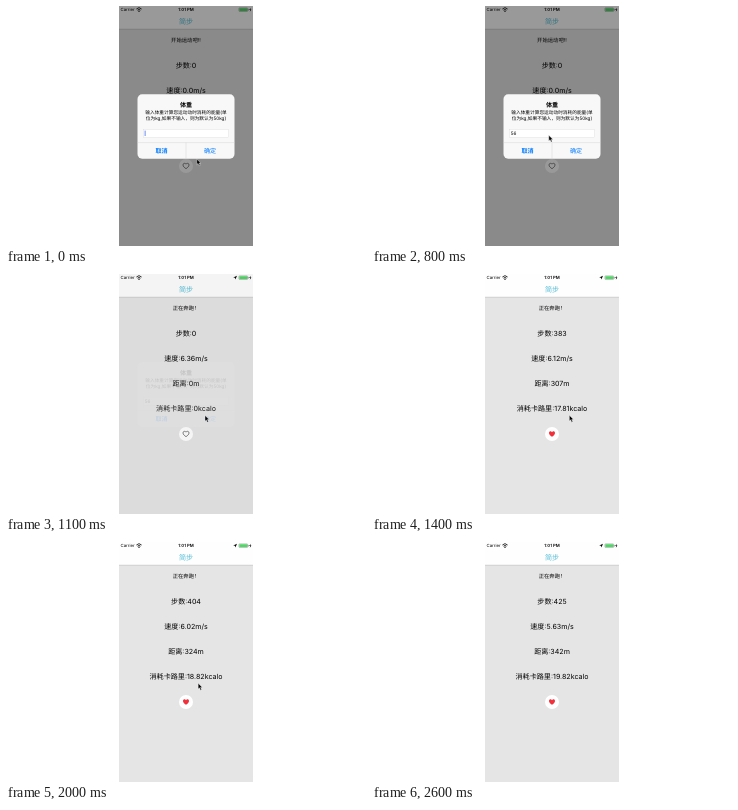
Write an HTML page that moves like this. It is 360 by 240 pixels and loops after 2.7 s.

```html
<!DOCTYPE html>
<html lang="zh-CN">
<head>
<meta charset="utf-8">
<title>简步</title>
<style>
  html, body { margin: 0; width: 100%; height: 100%; overflow: hidden; background: #fff; }
  svg { display: block; width: 360px; height: 240px; }
  text {
    font-family: Inter, "Noto Sans CJK SC", "Noto Sans CJK", sans-serif;
    text-anchor: middle; text-rendering: geometricPrecision; fill: #000;
  }
  .row { font-size: 7.1px; }
  .hint { font-size: 5.35px; }
  .bar { font-size: 4.3px; }
  .msg { font-size: 4.7px; }
  .btn { font-size: 6.1px; fill: #007aff; }
  .left { text-anchor: start; }
</style>
</head>
<body>
<svg viewBox="0 0 360 240">
  <defs><clipPath id="phone"><rect x="113" width="134" height="240"/></clipPath></defs>
  <g clip-path="url(#phone)">
    <rect x="113" width="134" height="240" fill="#e5e5e5"/>
    <rect x="113" width="134" height="23" fill="#fefefe"/>
    <path d="M113 23.2H247" stroke="#b4b4b4" stroke-width=".5"/>

    <text class="bar left" x="114.5" y="5.2">Carrier</text>
    <g fill="none" stroke="#000" stroke-width=".8">
      <path d="M130.4 3a3.6 3.6 0 0 1 5.2 0M131.5 4.2a2.1 2.1 0 0 1 3 0"/>
    </g>
    <circle cx="133" cy="5.3" r=".7"/>
    <text class="bar" x="180" y="5.2" font-weight="600">1:01 PM</text>
    <path id="arrow" d="M231 1.7L229.4 5.6L229 3.8L227.2 3.4Z"/>
    <rect x="232.9" y="1.9" width="8.8" height="3.6" rx=".7" fill="#fff" stroke="#555" stroke-width=".35"/>
    <rect x="233.3" y="2.3" width="8" height="2.8" rx=".4" fill="#4cd964"/>
    <path d="M242.2 3V4.5" stroke="#333" stroke-width=".5"/>
    <path d="M244.7 1.8L243.2 4H244.2L243.8 5.8L245.4 3.4H244.4Z"/>

    <text x="180" y="17.8" font-size="7.1" style="fill:#58bfd8">简步</text>
    <text class="hint" id="hint" x="180" y="35.9"></text>
    <text class="row" id="steps" x="180" y="61.7"></text>
    <text class="row" id="speed" x="180" y="87"></text>
    <text class="row" id="dist" x="180" y="112.2"></text>
    <text class="row" id="kcal" x="180" y="137.4"></text>

    <circle cx="180" cy="160" r="7" fill="#fff"/>
    <path id="heart" stroke-width=".65" d="M180 162.7C178.3 161.5 177 160.4 177 158.9C177 157.1 179.2 156.7 180 158.2C180.8 156.7 183 157.1 183 158.9C183 160.4 181.7 161.5 180 162.7Z"/>

    <rect id="dim" x="113" width="134" height="240"/>

    <g id="alert">
      <rect x="131.5" y="88.3" width="97" height="64.4" rx="4.6" fill="#f8f8f8"/>
      <text x="180" y="101.4" font-size="6.1" font-weight="600">体重</text>
      <text class="msg" x="180" y="108.3">输入体重计算您运动动时消耗的能量(单</text>
      <text class="msg" x="180" y="114.2">位为kg,如果不输入，则为默认为50kg)</text>
      <rect x="137.5" y="123.2" width="85" height="8.3" fill="#fff" stroke="#d4d4d4" stroke-width=".35"/>
      <text class="msg left" id="typed" x="138.8" y="129"></text>
      <rect id="caret" x="138.7" y="124.6" width=".8" height="5.4" fill="#4a6ff0"/>
      <path d="M131.5 136.6H228.5M180 136.6V152.7" stroke="#cdcdd0" stroke-width=".4"/>
      <text class="btn" x="155.6" y="146.7" font-weight="600">取消</text>
      <text class="btn" x="204" y="146.7">确定</text>
    </g>

    <path id="pointer" d="M0 0V5.7L1.3 4.5L2.3 6.8L3.4 6.3L2.4 4.1H4.2Z" stroke="#fff" stroke-width=".4"/>
  </g>
</svg>
<script>
const LOOP = 2700, TICK = 100;
const $ = id => document.getElementById(id);
const set = (id, attrs) => { for (const k in attrs) $(id).setAttribute(k, attrs[k]); };
const say = (id, s) => { if ($(id).textContent !== s) $(id).textContent = s; };

// steps, m/s, metres; a new reading every 200 ms
const RUN = [
  [383, 6.12, 306.94], [390, 6.05, 312.74], [397, 5.99, 318.54], [404, 6.02, 324.34],
  [411, 5.96, 330.14], [418, 5.98, 335.94], [425, 5.63, 341.63]
];
const KCAL_PER_M = 0.056 * 1.036;

// time, x, y of the pointer tip
const PATH = [
  [0, 190.7, 153], [500, 169, 125], [700, 169, 125], [1000, 199, 141.5],
  [1200, 199, 141.5], [1800, 192.6, 141], [2300, 191.4, 142], [2700, 191.4, 142]
];

function pointerAt(t) {
  const i = PATH.findIndex(p => p[0] > t), a = PATH[i - 1], b = PATH[i];
  const u = (t - a[0]) / (b[0] - a[0]), e = u * u * (3 - 2 * u);
  return [a[1] + (b[1] - a[1]) * e, a[2] + (b[2] - a[2]) * e];
}

function render(time) {
  const t = Math.floor(time % LOOP / TICK) * TICK;
  const running = t >= 1100, beating = t >= 1200;
  const fade = t < 1100 ? 1 : t < 1200 ? 0.1 : 0;
  const [steps, speed, metres] = t >= 1300
    ? RUN[Math.floor((t - 1300) / 200)]
    : [0, running ? 6.36 : 0, 0];

  say('hint', running ? '正在奔跑！' : '开始运动吧!!');
  say('steps', '步数:' + steps);
  say('speed', '速度:' + (running ? speed.toFixed(2) : '0.0') + 'm/s');
  say('dist', '距离:' + Math.round(metres) + 'm');
  say('kcal', '消耗卡路里:' + (metres ? (metres * KCAL_PER_M).toFixed(2) : 0) + 'kcalo');
  say('typed', t < 700 ? '' : t < 800 ? '5' : '56');

  set('arrow', { opacity: running ? 1 : 0 });
  set('heart', { fill: beating ? '#f0303a' : 'none', stroke: beating ? 'none' : '#444' });
  set('dim', { opacity: 0.4 * fade });
  set('alert', { opacity: fade });
  set('caret', { opacity: t >= 700 ? 0 : t / TICK % 2 ? 0.3 : 1 });

  const [x, y] = pointerAt(t);
  set('pointer', { transform: `translate(${x} ${y})`, opacity: t < 2600 ? 1 : 0 });
}

const start = performance.now();
function frame() {
  render(performance.now() - start);
  requestAnimationFrame(frame);
}
frame();
</script>
</body>
</html>
```
